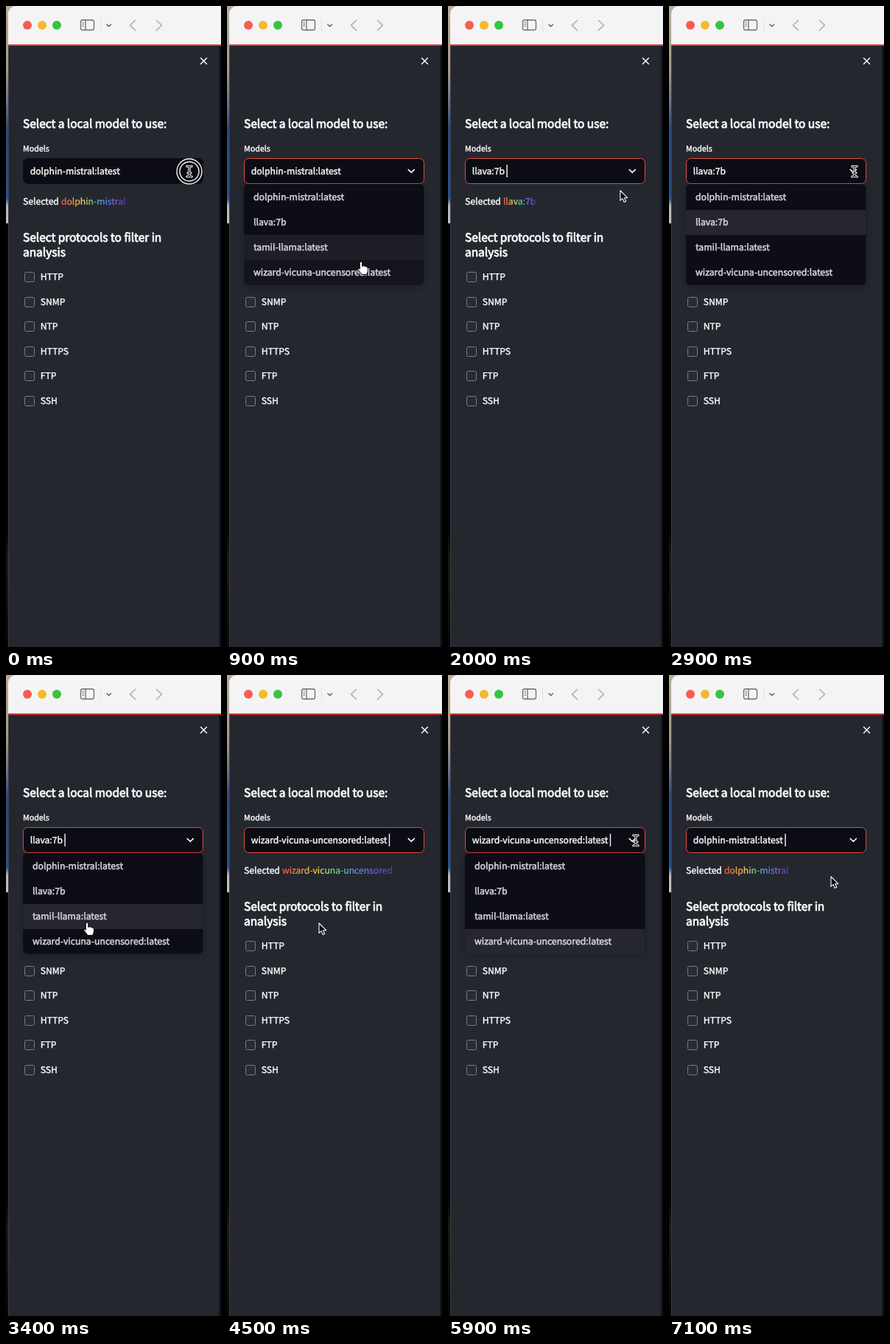
Animation, 292 px wide and 868 px high, one loop 7200 ms. Source, as an HTML page:

```html
<!DOCTYPE html>
<html lang="en">
<head>
<meta charset="utf-8">
<title>Model picker</title>
<style>
  html, body { margin: 0; width: 100%; height: 100%; overflow: hidden; background: #000; }
  svg { display: block; width: 292px; height: 868px; }
  text {
    font: 400 12.16px "Noto Sans CJK JP", "Noto Sans CJK SC", "Noto Sans CJK", "Noto Sans", sans-serif;
    text-rendering: geometricPrecision;
    fill: #fafafa; stroke: #fafafa; stroke-width: .42px;
  }
  .title { font-size: 15.45px; stroke-width: .85px; }
  .label { font-size: 10.68px; }
  .item { font-size: 12.26px; fill: #d6d6da; stroke: #d6d6da; stroke-width: .5px; }
  #picked { fill: url(#rainbow); stroke: url(#rainbow); stroke-width: .2px; }
  .line { fill: none; stroke-linecap: round; stroke-linejoin: round; }
</style>
</head>
<body>
<svg viewBox="0 0 292 868">
  <defs>
    <linearGradient id="rainbow">
      <stop offset="0" stop-color="#ff5348"/>
      <stop offset=".16" stop-color="#fb9340"/>
      <stop offset=".33" stop-color="#f0dd58"/>
      <stop offset=".5" stop-color="#5fd49a"/>
      <stop offset=".67" stop-color="#4d9ce8"/>
      <stop offset=".84" stop-color="#7d5ce0"/>
      <stop offset="1" stop-color="#5b36a6"/>
    </linearGradient>
    <linearGradient id="wall" x2="0" y2="1">
      <stop offset="0" stop-color="#b9ab95"/>
      <stop offset=".1" stop-color="#a59a88"/>
      <stop offset=".15" stop-color="#6c7486"/>
      <stop offset=".19" stop-color="#2d4a7c"/>
      <stop offset=".3" stop-color="#25508f"/>
      <stop offset=".312" stop-color="#b4b6ba"/>
      <stop offset=".338" stop-color="#c4c4c4"/>
      <stop offset=".34" stop-color="#050506"/>
      <stop offset=".82" stop-color="#050506"/>
      <stop offset=".86" stop-color="#1b1a10"/>
      <stop offset=".93" stop-color="#12110c"/>
      <stop offset="1" stop-color="#060606"/>
    </linearGradient>
    <clipPath id="menuClip"><rect x="23" y="241" width="244.5" height="136.7" rx="6"/></clipPath>
    <filter id="soft" x="-20%" y="-20%" width="140%" height="140%"><feGaussianBlur stdDeviation="4"/></filter>
  </defs>

  <rect width="6" height="868" fill="url(#wall)"/>
  <rect width="14" height="14" fill="#b9ab95"/>

  <!-- window bar -->
  <path d="M3 54V11A11 11 0 0 1 14 0H292V54Z" fill="#f5f4f4"/>
  <circle cx="29" cy="26" r="6" fill="#f95c50"/>
  <circle cx="49" cy="26" r="6" fill="#f6b92c"/>
  <circle cx="69" cy="26" r="6" fill="#37c43f"/>
  <g class="line" stroke="#6d6c6c" stroke-width="1.3">
    <rect x="101.5" y="19" width="18" height="13.5" rx="2.5"/>
    <path d="M108 19V32.5"/>
    <path d="M103.8 22.3h1.8M103.8 24.8h1.8M103.8 27.3h1.8" stroke-width="1"/>
    <path d="M136.8 25l2.9 2.7 2.9-2.7" stroke-width="1.6"/>
  </g>
  <path d="M128.5 17V35" stroke="#e3e2e2"/>
  <path class="line" d="M175.5 19.5l-7 6.7 7 6.7M204.5 19.5l7 6.7-7 6.7" stroke="#b3b2b2" stroke-width="1.6"/>

  <!-- sidebar -->
  <rect x="3" y="54" width="289" height="814" fill="#13151c"/>
  <rect x="3" y="54" width="286" height="814" fill="#25272f"/>
  <path d="M3.5 54V868" stroke="#3a3c43"/>
  <rect x="3" y="52" width="289" height="2" fill="#d43a33"/>
  <path class="line" d="M264.5 70.5l8 8M272.5 70.5l-8 8" stroke="#fafafa" stroke-width="1.5"/>

  <text class="title" x="23" y="165">Select a local model to use:</text>
  <text class="label" x="23" y="197">Models</text>
  <rect id="box" x="23.5" y="206.5" width="244" height="34" rx="6" fill="#0b0c14"/>
  <text id="value" x="32.7" y="228"></text>
  <rect id="caret" y="215" width="1.4" height="17" fill="#fafafa"/>
  <path class="line" d="M246.3 221.6l4 3.9 4-3.9" stroke="#fafafa" stroke-width="1.7"/>
  <text x="23" y="269">Selected</text>
  <text id="picked" x="74.9" y="269"></text>
  <text class="title" x="23" y="319">Select protocols to filter in</text>
  <text class="title" x="23" y="339">analysis</text>
  <g id="checks"></g>

  <g id="menu">
    <rect x="23" y="243" width="244" height="138" rx="6" fill="#0b0c12" opacity=".3" filter="url(#soft)"/>
    <g clip-path="url(#menuClip)">
      <rect x="23" y="241" width="245" height="137" fill="#0c0d15"/>
      <g id="rows"></g>
    </g>
  </g>

  <g id="cursor">
    <g id="ring" fill="none">
      <circle r="17" fill="#0b0c12" stroke="#f4f4f4" stroke-width="1.4"/>
      <circle r="13" stroke="#f4f4f4" stroke-width="1.4"/>
    </g>
    <g id="beam" class="line">
      <path d="M-3.2-7Q0-7 0-5V5Q0 7-3.2 7M3.2-7Q0-7 0-5M0 5Q0 7 3.2 7M-2 2H2" stroke="#fff" stroke-width="3.2"/>
      <path d="M-3.2-7Q0-7 0-5V5Q0 7-3.2 7M3.2-7Q0-7 0-5M0 5Q0 7 3.2 7M-2 2H2" stroke="#111" stroke-width="1.1"/>
    </g>
    <path id="hand" transform="scale(1.1)" d="M-1.5 1c0-2 3-2 3 0v4l1-.5c1-.3 1.9 0 2.1.7 1-.3 1.9 0 2.1.8 1-.1 1.8.4 1.8 1.3v3c0 2-1.4 3-1.4 4.7H.5c0-1.6-2.9-3.9-4.1-6-.7-1.2.8-2 1.7-1.1l.4.6z"
      fill="#fff" stroke="#111" stroke-width=".9"/>
    <path id="arrow" d="M0 0V13.4L3.1 10.6 5.2 15.6 7.7 14.5 5.6 9.7H9.7Z" fill="#0a0a0a" stroke="#fff" stroke-width="1.1" stroke-linejoin="round"/>
  </g>
</svg>

<script>
const LOOP = 7200, STEP = 100, ROW = 34, TOP = 242;
const $ = id => document.getElementById(id);
const clamp = v => Math.max(0, Math.min(1, v));

// name, caret x
const models = [
  ["dolphin-mistral:latest", 157.3],
  ["llava:7b", 79.4],
  ["tamil-llama:latest", 135.5],
  ["wizard-vicuna-uncensored:latest", 219.8]
];
// menu opens, menu closes, model chosen
const picks = [[100, 1500, 1], [2500, 4300, 3], [5800, 6800, 0]];
const clicks = [0, 1400, 2400, 4200, 5700, 6700];
const caretResets = [200, 1600, 2400, 4200, 5500, 6700];
// time, x, y of the pointer tip
const path = [
  [0, 249, 224], [600, 249, 224], [800, 205, 325], [900, 182, 347], [1100, 150, 335],
  [1300, 120, 293], [1500, 120, 293], [2000, 234, 250], [2100, 244, 238], [2300, 252, 224],
  [2900, 252, 224], [3100, 190, 262], [3400, 110, 336], [3600, 114, 341], [3700, 114, 341],
  [4000, 124, 350], [4300, 124, 350], [4500, 125, 336], [4900, 130, 333], [5200, 205, 266],
  [5500, 255, 224], [5900, 255, 224], [6100, 240, 252], [6400, 214, 260], [6700, 214, 260],
  [7100, 220, 273], [7200, 220, 273]
];

$("checks").innerHTML = ["HTTP", "SNMP", "NTP", "HTTPS", "FTP", "SSH"].map((name, i) => {
  const y = 367 + i * 33.6;
  return `<rect x="25.5" y="${Math.round(y - 7) + .5}" width="13" height="13" rx="2" fill="#292a33" stroke="#7a7b83"/>
    <text x="46.8" y="${Math.round(y + 4)}">${name}</text>`;
}).join("");
$("rows").innerHTML = models.map(([name], i) =>
  `<rect x="23" y="${TOP + i * ROW}" width="245" height="${ROW}" fill="#25262e"/>
   <text class="item" x="36" y="${TOP + 20.5 + i * ROW}">${name}</text>`).join("");
const lights = [...$("rows").querySelectorAll("rect")];

function pointer(t) {
  const i = Math.max(1, path.findIndex(p => p[0] >= t));
  const [t0, x0, y0] = path[i - 1], [t1, x1, y1] = path[i];
  const k = clamp((t - t0) / (t1 - t0));
  return [x0 + (x1 - x0) * k, y0 + (y1 - y0) * k];
}

function chosen(t, delay = 0) {
  return picks.reduce((now, [, close, model]) => t >= close + delay ? model : now, 0);
}

function hovered(t) {
  const y = pointer(Math.max(0, t))[1];
  return y < TOP ? chosen(t) : Math.min(3, Math.floor((y - TOP) / ROW));
}

const show = (id, on) => $(id).setAttribute("visibility", on ? "visible" : "hidden");

function draw(t) {
  const [x, y] = pointer(t), model = chosen(t), focus = t >= 100;
  const fade = Math.max(...picks.map(([open, close]) =>
    Math.min(clamp((t - open + STEP) / 200), clamp((close + STEP - t) / 200)) * (t >= open)));

  $("value").textContent = models[model][0];
  $("picked").textContent = models[chosen(t, 200)][0].replace(":latest", "");
  $("box").setAttribute("stroke", focus ? "#e5483f" : "#0b0c14");

  const reset = caretResets.filter(r => r <= t).pop();
  $("caret").setAttribute("x", models[model][1]);
  show("caret", reset !== undefined && (t - reset) % 1000 < 500);

  // row light trails the pointer by one step
  $("menu").setAttribute("opacity", fade);
  const now = hovered(t), before = hovered(t - STEP);
  lights.forEach((r, i) => r.setAttribute("opacity", (i === before) * .7 + (i === now) * .3));

  const inBox = y > 206 && y < 241, onMenu = fade > .4 && y >= 241;
  $("cursor").setAttribute("transform", `translate(${x} ${y})`);
  show("beam", inBox);
  show("hand", !inBox && onMenu);
  show("arrow", !inBox && !onMenu);
  show("ring", clicks.some(c => t >= c && t < c + (c ? 200 : 100)));
}

const start = performance.now();
function tick() {
  const t = (performance.now() - start) % LOOP;
  draw(Math.floor(t / STEP) * STEP);
  requestAnimationFrame(tick);
}
tick();
</script>
</body>
</html>
```
